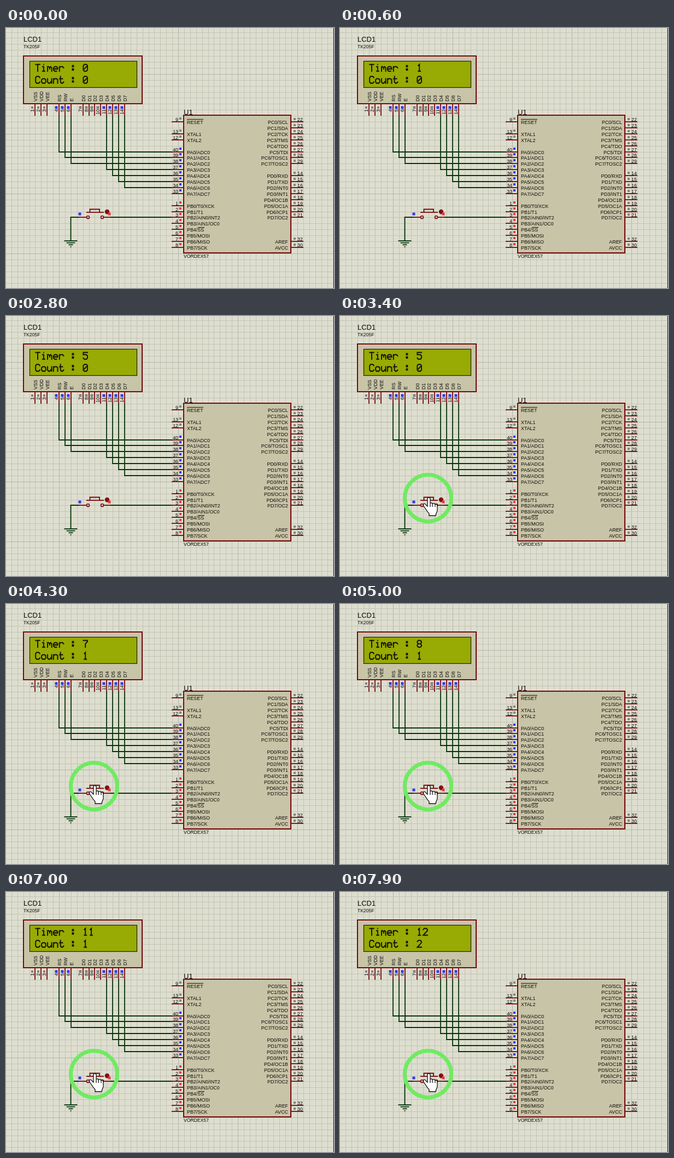
Recreate the animation shown at these times as an HTML page with a canvas. Size 600 px wide and 474 px high, loop 8 s.

```html
<!DOCTYPE html>
<html lang="en">
<head>
<meta charset="utf-8">
<title>Timer and counter circuit</title>
<style>
  html, body { margin: 0; width: 100%; height: 100%; overflow: hidden; background: #dddecf; }
  canvas { display: block; }
</style>
</head>
<body>
<canvas id="stage" width="600" height="474"></canvas>
<script>
const ctx = document.getElementById('stage').getContext('2d');
const LOOP = 8000, STEP = 10.9;
const TICK = 667, TICK_OFFSET = 570;   // timer period and phase
const PRESSES = [4250, 7450];          // moments the count goes up
const RED = '#780810', GREEN = '#08340c', BODY = '#c8c4a7', INK = '#0c0c0a';
const STATE = { g: '#86847a', b: '#3338ee', r: '#e8393e' };

const rowY = i => Math.round(171 + STEP * i);
const colX = i => Math.round(53.4 + STEP * i);

// Stroke font on a 5 x 7 dot cell
const GLYPHS = {
  T: 'M0 0H4M2 0V6',
  i: 'M2 0V.01M1 2H2V6M1 6H3',
  m: 'M0 6V2H1L2 3V4M2 3L3 2L4 3V6',
  e: 'M0 4H4V3L3 2H1L0 3V5L1 6H3',
  r: 'M0 2V6M0 3L1 2H3L4 3',
  ':': 'M1 1H2V2H1ZM1 4H2V5H1Z',
  C: 'M4 1L3 0H1L0 1V5L1 6H3L4 5',
  o: 'M1 2H3L4 3V5L3 6H1L0 5V3Z',
  u: 'M0 2V5L1 6H2L4 4M4 2V6',
  n: 'M0 2V6M0 3L1 2H3L4 3V6',
  t: 'M1 0V5L2 6H3L4 5M0 2H3',
  0: 'M1 0H3L4 1V5L3 6H1L0 5V1ZM1 4L3 2',
  1: 'M1 1L2 0V6M1 6H3',
  2: 'M0 1L1 0H3L4 1V2L0 6H4',
  3: 'M0 0H4L2 2L4 4V5L3 6H1L0 5',
  4: 'M3 6V0L0 3V4H4',
  5: 'M4 0H0V2H3L4 3V5L3 6H1L0 5',
  6: 'M3 0H2L0 2V5L1 6H3L4 5V4L3 3H0',
  7: 'M0 0H4V1L2 3V6',
  8: 'M1 0H3L4 1V2L3 3H1L0 2V1ZM1 3L0 4V5L1 6H3L4 5V4L3 3',
  9: 'M4 3H1L0 2V1L1 0H3L4 1V4L2 6H1'
};
for (const k in GLYPHS) GLYPHS[k] = new Path2D(GLYPHS[k]);

const HAND = new Path2D('M-1 1C-1-2 4-2 4 1V10C4 8 8 8 8 11C8 9 13 9 13 12' +
  'C13 10 17 11 17 14V22C17 26 14 27 14 32H2V28C-2 24-5 19-8 14C-10 10-6 9-4 12L-1 15Z');
const FINGERS = new Path2D('M4 10v6M8 11v5M13 12v4');

// Left pins: row, number, name, state
const LEFT = [[0, 9, 'RESET', 'g'], [2, 13, 'XTAL1', 'g'], [3, 12, 'XTAL2', 'g']];
for (let i = 0; i < 8; i++) LEFT.push([5 + i, 40 - i, `PA${i}/ADC${i}`, 'b']);
['T0/XCK', 'T1', 'AIN0/INT2', 'AIN1/OC0', 'SS', 'MOSI', 'MISO', 'SCK']
  .forEach((s, i) => LEFT.push([14 + i, 1 + i, `PB${i}/${s}`, 'r']));

// Right pins: row, number, name
const RIGHT = [[20, 32, 'AREF'], [21, 30, 'AVCC']];
['SCL', 'SDA', 'TCK', 'TMS', 'TDO', 'TDI', 'TOSC1', 'TOSC2']
  .forEach((s, i) => RIGHT.push([i, 22 + i, `PC${i}/${s}`]));
['RXD', 'TXD', 'INT0', 'INT1', 'OC1B', 'OC1A', 'ICP1', 'OC2']
  .forEach((s, i) => RIGHT.push([9 + i, 14 + i, `PD${i}/${s}`]));

// Display pins: column, name, state
const LCD_PINS = [[0, 'VSS', 'g'], [1, 'VDD', 'g'], [2, 'VEE', 'g'],
  [4, 'RS', 'b'], [5, 'RW', 'b'], [6, 'E', 'b']];
for (let i = 0; i < 8; i++) LCD_PINS.push([8 + i, 'D' + i, i < 4 ? 'g' : 'b']);

function line(color, width, ...p) {
  ctx.strokeStyle = color;
  ctx.lineWidth = width;
  ctx.beginPath();
  for (let i = 0; i < p.length; i += 2) ctx.lineTo(p[i], p[i + 1]);
  ctx.stroke();
}

function box(x, y, w, h, fill, edge, width) {
  ctx.fillStyle = fill;
  ctx.fillRect(x, y, w, h);
  ctx.strokeStyle = edge;
  ctx.lineWidth = width;
  ctx.strokeRect(x, y, w, h);
}

function label(s, x, y, size = 8.9, align = 'left') {
  ctx.font = `${size}px "Liberation Sans", Arial, sans-serif`;
  ctx.textAlign = align;
  ctx.fillStyle = INK;
  ctx.fillText(s, x, y);
}

function upLabel(s, x, y, align) {
  ctx.save();
  ctx.translate(x, y);
  ctx.rotate(-Math.PI / 2);
  label(s, 0, 0, 8.9, align);
  ctx.restore();
}

function marker(x, y, state, size = 4) {
  ctx.fillStyle = STATE[state];
  ctx.fillRect(x - size / 2, y - size / 2, size, size);
}

function disc(x, y, r, fill, edge, width) {
  ctx.beginPath();
  ctx.arc(x, y, r, 0, 2 * Math.PI);
  if (fill) { ctx.fillStyle = fill; ctx.fill(); }
  if (edge) { ctx.strokeStyle = edge; ctx.lineWidth = width; ctx.stroke(); }
}

function drawGrid() {
  ctx.fillStyle = '#dddecf';
  ctx.fillRect(0, 0, 600, 474);
  // every tenth line is heavier
  const shade = heavy => heavy ? '#b3b4a5' : '#c3c4b4';
  for (let i = -4; colX(i) < 600; i++) {
    const x = colX(i) + 0.5;
    line(shade(i % 10 === 4 || i === -6), 1, x, 0, x, 474);
  }
  for (let i = -15; rowY(i) < 474; i++) {
    const y = rowY(i) + 0.5;
    line(shade((i + 28) % 10 === 0), 1, 0, y, 600, y);
  }
  line('#33322e', 1, 599.5, 0, 599.5, 474);
}

function drawWires() {
  [4, 5, 6, 12, 13, 14, 15].forEach((c, i) =>
    line(GREEN, 1.8, colX(c), 160, colX(c), rowY(5 + i), 304, rowY(5 + i)));
  line(GREEN, 1.8, 190, 345, 304, 345);
  line(GREEN, 1.8, 134, 345, 118.5, 345, 118.5, 388);
  [12, 8, 4, 1].forEach((w, i) =>
    line(GREEN, 1.8, 118.5 - w, 388 + 3.6 * i, 118.5 + w, 388 + 3.6 * i));
}

function drawChip() {
  box(325, 159, 196, 251, BODY, RED, 2);
  label('U1', 325, 158, 13);
  label('VORDEX57', 325, 419, 8.6);
  for (const [row, num, name, state] of LEFT) {
    const y = rowY(row);
    line(RED, 1.8, 303, y, 325, y);
    label(num, 315, y - 1, 8.9, 'right');
    marker(319, y - 6, state);
    label(name, 331, y + 4);
  }
  for (const [row, num, name] of RIGHT) {
    const y = rowY(row);
    line(RED, 1.8, 521, y, 544, y);
    label(num, 533, y - 1);
    marker(528, y - 5, 'g');
    label(name, 516, y + 4, 8.9, 'right');
  }
  line(INK, 1, 331, 166.5, 361, 166.5);
  line(INK, 1, 351, rowY(18) - 3.5, 363, rowY(18) - 3.5);
}

function drawLcd() {
  label('LCD1', 32, 25, 13);
  label('TK205F', 32, 37, 8.6);
  box(32, 51, 217, 87, BODY, RED, 2);
  box(43.5, 60.5, 196, 48, '#98aa04', '#1c1e08', 1.2);
  LCD_PINS.forEach(([col, name, state], i) => {
    const x = colX(col);
    line(RED, 1.8, x, 138, x, 160);
    upLabel(name, x + 4, 134, 'left');
    upLabel(i + 1, x - 2, 148, 'right');
    marker(x - 5, 145, state, i > 2 ? 5 : 4);
  });
}

function lcdText(s, y) {
  ctx.lineCap = 'square';
  ctx.strokeStyle = '#101402';
  ctx.lineWidth = 1;
  [...s].forEach((ch, i) => {
    if (!GLYPHS[ch]) return;
    ctx.save();
    ctx.translate(54.2 + STEP * i, y);
    ctx.scale(1.9, 2.05);
    ctx.stroke(GLYPHS[ch]);
    ctx.restore();
  });
  ctx.lineCap = 'butt';
}

function drawButton() {
  line(RED, 1.8, 133, 345, 147, 345);
  line(RED, 1.8, 179, 345, 191, 345);
  disc(150, 345, 2.5, null, RED, 1.7);
  disc(176, 345, 2.5, null, RED, 1.7);
  line(RED, 1.8, 147, 336, 179, 336);
  line(RED, 1.8, 153.5, 336, 153.5, 330.5, 171, 330.5, 171, 336);
  marker(135, 339, 'b', 5);
  disc(185, 335, 3.6, '#b3161d', '#5e0d12', 1.2);
  line('#3c0a0d', 1.2, 183, 333, 185, 337, 187, 334);
  marker(189, 339, 'r', 5);
}

function drawCursor(t) {
  const p = Math.min(1, (t - 2850) / 500);
  if (p < 0) return;
  const rest = (1 - p) ** 2;
  ctx.save();
  ctx.translate(161 + 50 * rest, 332 + 192 * rest);
  disc(0, 0, 42.5, null, '#70ea62', 7);
  ctx.fillStyle = '#fff';
  ctx.strokeStyle = '#111';
  ctx.lineWidth = 1.3;
  ctx.fill(HAND);
  ctx.stroke(HAND);
  ctx.stroke(FINGERS);
  ctx.restore();
}

function draw(t) {
  drawGrid();
  drawWires();
  drawLcd();
  lcdText('Timer : ' + Math.floor((t + TICK_OFFSET) / TICK), 66.4);
  lcdText('Count : ' + PRESSES.filter(at => t >= at).length, 88.3);
  drawChip();
  drawButton();
  drawCursor(t);
}

const start = performance.now();
function frame(now) {
  draw(Math.max(0, now - start) % LOOP);
  requestAnimationFrame(frame);
}
draw(0);
requestAnimationFrame(frame);
</script>
</body>
</html>
```
